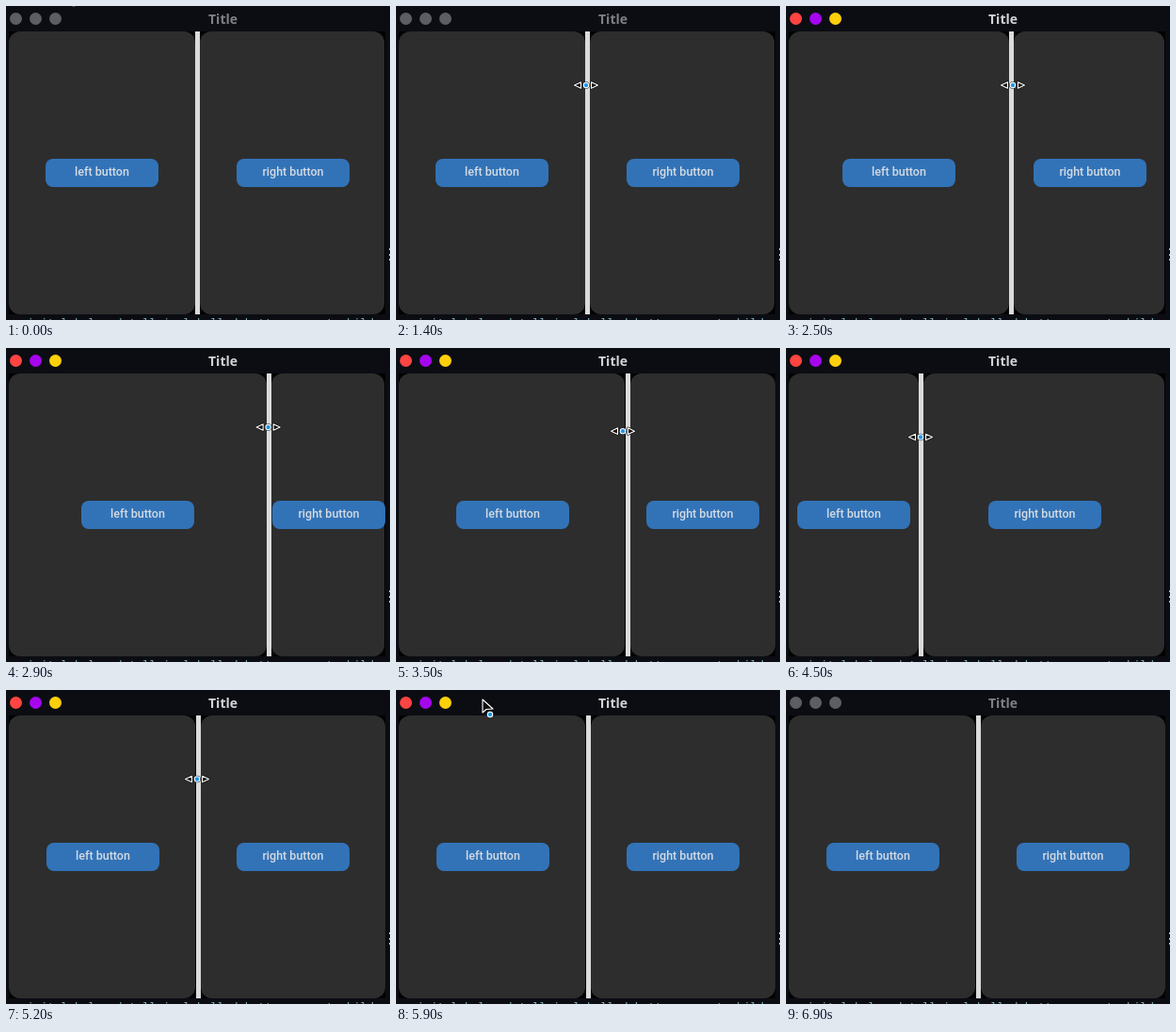
An HTML page with a canvas for the animation above (7200 ms loop, 408 by 333 pixels).

```html
<!DOCTYPE html>
<html lang="en">
<head>
<meta charset="utf-8">
<title>Paned window</title>
<style>
  html, body { margin: 0; width: 100%; height: 100%; overflow: hidden; background: #0b0d13; }
  canvas { display: block; }
</style>
</head>
<body>
<canvas id="stage" width="408" height="333"></canvas>
<script>
const ctx = document.getElementById('stage').getContext('2d');
const LOOP = 7200, STEP = 100;
const LEFT = 3, RIGHT = 403, TOP = 27, HEIGHT = 300, SASH = 5;

function ease(t, from, to) {
  const p = Math.min(1, Math.max(0, (t - from) / (to - from)));
  return p * p * (3 - 2 * p);
}

// Three drags: right, far left, back to the middle
const sashAt = t => 201 + 76 * ease(t, 2095, 2930)
  - 144 * ease(t, 3257, 4041) + 69 * ease(t, 4370, 5000);

function rect(x, y, w, h, color) {
  ctx.fillStyle = color;
  ctx.fillRect(x, y, w, h);
}

function roundRect(x, y, w, h, r, color) {
  ctx.fillStyle = color;
  ctx.beginPath();
  ctx.roundRect(x, y, w, h, r);
  ctx.fill();
}

function disc(x, y, r, color) {
  ctx.fillStyle = color;
  ctx.beginPath();
  ctx.arc(x, y, r, 0, Math.PI * 2);
  ctx.fill();
}

function text(str, x, y, font, color, align = 'center') {
  ctx.font = font;
  ctx.fillStyle = color;
  ctx.textAlign = align;
  ctx.fillText(str, x, y);
}

function outlined(points) {
  ctx.beginPath();
  points.forEach(([x, y]) => ctx.lineTo(x, y));
  ctx.closePath();
  ctx.lineJoin = 'round';
  ctx.fillStyle = '#111';
  ctx.fill();
  ctx.strokeStyle = '#111';
  ctx.lineWidth = 2.4;
  ctx.stroke();
  ctx.strokeStyle = '#fff';
  ctx.lineWidth = 1.1;
  ctx.stroke();
}

function dot(x, y) {
  disc(x, y, 3.8, '#222c36');
  disc(x, y, 3.2, '#fff');
  disc(x, y, 2.2, '#2196e8');
}

function arrow(x, y) {
  outlined([[x + 1, y + 1], [x + 1, y + 15], [x + 5, y + 11.5], [x + 12, y + 11]]);
  dot(x + 9, y + 17);
}

function grip(x, y) {
  for (const s of [-1, 1])
    outlined([[x + s * 12.5, y], [x + s * 5.5, y - 3.3], [x + s * 5.5, y + 3.3]]);
  dot(x, y);
}

function backdrop() {
  rect(0, 0, 408, 333, '#0b0d13');
  text('  init_label_and_tall_in_labelled_button = root.child', 8, 341,
    '12px "DejaVu Sans Mono", monospace', '#7fb4bd', 'left');
  for (const y of [257, 263, 268]) rect(407, y, 1, 2, '#b9bbc0');
}

function titleBar(active) {
  const colors = active ? ['#ff4541', '#a606ee', '#fdd00c'] : Array(3).fill('#5d5e63');
  colors.forEach((c, i) => disc(10.5 + 21 * i, 13.5, 6.5, c));
  text('Title', 230.5, 19, '600 14px "Noto Sans", sans-serif', active ? '#d2d3d5' : '#7f8085');
}

function pane(x, end, label) {
  const width = end - x, mid = Math.round((x + end) / 2);
  roundRect(x, TOP, width - width % 2, HEIGHT, 12, '#2d2d2d');
  roundRect(mid - 60, 162, 120, 30, 8, '#3273b8');
  text(label, mid, 180, '500 12.5px Roboto, sans-serif', '#d5dbe2');
}

function pointer(t) {
  if (t < 1400) {
    const p = ease(t, 600, 1300);
    arrow(63 + 137 * p, -20 + 110 * p);
  } else if (t < 5300) {
    // The pane trails the pointer in proportion to its speed
    const lead = 0.2 * (sashAt(t) - sashAt(t - STEP));
    grip(sashAt(t) + 1 + lead, 84 + 10.5 * ease(t, 3050, 4100));
  } else if (t < 6300) {
    const out = ease(t, 5200, 5900), off = ease(t, 5900, 6300);
    arrow(203 - 112 * out - 5 * off, 95 - 86 * out - 33 * off);
  }
}

function draw(now) {
  const t = Math.floor(now % LOOP / STEP) * STEP;
  const sash = Math.round(sashAt(t));
  backdrop();
  titleBar(t >= 2100 && t < 6900);
  rect(LEFT, TOP, RIGHT - LEFT, HEIGHT, '#020203');
  pane(LEFT, sash, 'left button');
  pane(sash + SASH, RIGHT, 'right button');
  rect(sash, TOP, SASH, HEIGHT, '#dbdbdb');
  pointer(t);
}

const start = performance.now();
function tick() {
  draw(performance.now() - start);
  requestAnimationFrame(tick);
}
tick();
</script>
</body>
</html>
```
